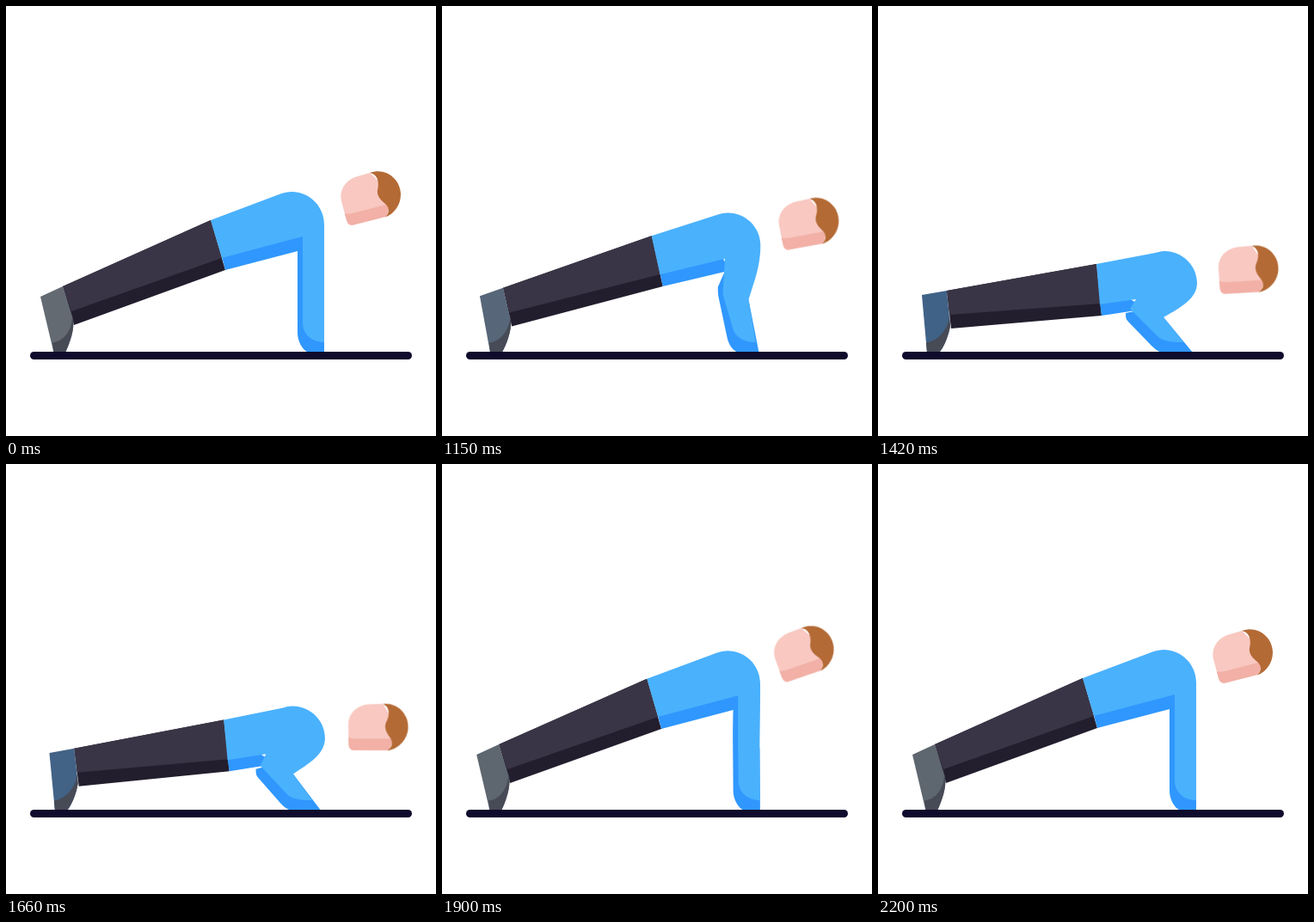
Write an HTML page without scripts that moves like this. It is 500 by 500 pixels and loops after 2.23 s.

```html
<!DOCTYPE html>
<html lang="en">
<head>
<meta charset="utf-8">
<title>Push-up</title>
<style>
  html, body { margin: 0; width: 100%; height: 100%; overflow: hidden; background: #fff; }
  svg { display: block; width: 100%; height: 100%; }

  /* Shapes are drawn in the raised pose; --down holds the lowered pose. */
  path, .move { animation: 2230ms infinite; }
  .morph { animation-name: morph; }
  .shoe { animation-name: morph, tint; }
  .move { animation-name: move; }
  .nod { animation-name: nod; transform-origin: 367px 258px; animation-duration: 2230ms; animation-iteration-count: infinite; }
  .drop { --down: translate(6px, 84.5px); }
  .turn { --down: rotate(11deg); transform-origin: 424px 223px; }

  @keyframes morph {
    0% { animation-timing-function: linear; }
    44.843% { animation-timing-function: cubic-bezier(.25, 0, .67, 1); }
    63.229%, 72.646% { d: var(--down); animation-timing-function: cubic-bezier(.33, 0, .67, 1); }
  }
  @keyframes morph {
    0%, 44.843% { d: var(--up); animation-timing-function: cubic-bezier(.25, 0, .67, 1); }
    63.229%, 72.646% { d: var(--down); animation-timing-function: cubic-bezier(.33, 0, .67, 1); }
    86.278%, 100% { d: var(--up); }
  }
  @keyframes move {
    0%, 44.843% { transform: none; animation-timing-function: cubic-bezier(.25, 0, .67, 1); }
    63.229%, 72.646% { transform: var(--down); animation-timing-function: cubic-bezier(.33, 0, .67, 1); }
    86.278%, 100% { transform: none; }
  }
  @keyframes tint {
    0%, 44.843% { fill: #636a72; animation-timing-function: cubic-bezier(.25, 0, .67, 1); }
    63.229%, 72.646% { fill: #406287; animation-timing-function: cubic-bezier(.33, 0, .67, 1); }
    86.278%, 100% { fill: #5e666f; }
  }
  /* The head sinks at the bottom, then swings past its rest pose. */
  @keyframes nod {
    0%, 63.677% { transform: rotate(0deg); animation-timing-function: ease-in-out; }
    73.543% { transform: rotate(4deg); animation-timing-function: cubic-bezier(.55, 0, .8, .9); }
    89.686% { transform: rotate(-10.5deg); animation-timing-function: ease-in-out; }
    97.309%, 100% { transform: rotate(0deg); }
  }

  .leg-shade {
    --up: path("M66 326 L238 249 L255 307 L79 371 Z");
    --down: path("M80 331 L254 300 L260 360 L85 375 Z");
  }
  .leg {
    --up: path("M66 326 L238 249 L251 293 L76 355 Z");
    --down: path("M80 331 L254 300 L258.5 346 L83 359 Z");
  }
  .shoe {
    --up: path("M40 338 L66 326 L78 364 C80 376 74 392 69 403 L55.5 403 Z");
    --down: path("M51 336 L80 331 L84 372 C82 384 76 398 71 403 L57 403 Z");
  }
  .sole {
    --up: path("M54 391.5 C68 390 77 376 77 361 L78 364 C80 376 74 392 69 403 L55.5 403 Z");
    --down: path("M56 391.5 C69 390 82 376 83 360 L84 372 C82 384 76 398 71 403 L57 403 Z");
  }
  .shirt-shade {
    --up: path("M251 292 L345 267 L370 330 L370 403 L352 403 C344 400 339 389 339 380 L339 325 C339 320 339 315 339 310 L339 285 L255 307 Z");
    --down: path("M258 346 L293 341 L332 362 L366 403 L331 403 C326 402 322 399 318 395 L291 367 C288 364 288 361 288 357 L310 352.5 L260 360 Z");
  }
  .shirt {
    --up: path("M238 249 L319 218.5 C323 217 328 216 332 216 C353 216 370 233 370 254 C370 280 370 300 370 330 L370 391 C356 391 345 382 345 368 L345 325 L345 268 L251 293 Z");
    --down: path("M254 300 L320 287.5 C324 286.5 329 285 333 285 C354 285 371 302 371 322 C371 340 353 350 332 362 L355.5 391 C342 391 331 390 325 384 L293 352 L300 341 L258 347 Z");
  }
</style>
</head>
<body>
<svg viewBox="0 0 500 500">
  <path class="morph leg-shade" fill="#231e2e"/>
  <path class="morph leg" fill="#3a3546"/>
  <path class="shoe"/>
  <path class="morph sole" fill="#474b56"/>
  <path class="morph shirt-shade" fill="#2f97fe"/>
  <path class="morph shirt" fill="#4ab1fd"/>

  <g class="move drop"><g class="nod"><g class="move turn">
    <path fill="#f8c8c1" d="M423 194 L409 198 C394 202 387 215 390 227 L396 249 Q398 256 404 254.5 L442 245 L450 220 Z"/>
    <path fill="#f2b0a6" d="M393.8 241.5 Q398 242 403 241 L436 232.500 L446 230 L443 244.500 L404 254.500 Q398 256 396 249 Z"/>
    <path fill="#b46a35" d="M423 194 C441 187 459 201 459 219 C459 231 452 241 441.500 245.500 C446 240 446 234 441 230 C436 226 431 221 432 214 C434 206 433 196 423 194 Z"/>
  </g></g></g>

  <path d="M32.500 406.500 H467.500" stroke="#0f0b2c" stroke-width="9" stroke-linecap="round"/>
</svg>
</body>
</html>
```
